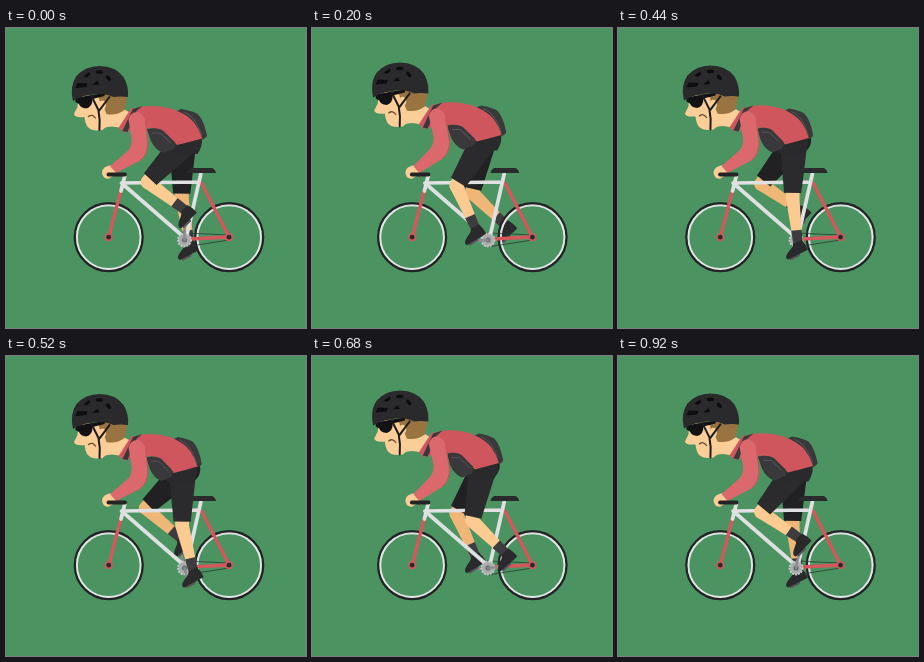
Recreate the animation shown at these times as an HTML page. Size 300x300 px, loop 0.96 s.

```html
<!DOCTYPE html>
<html lang="en">
<head>
<meta charset="utf-8">
<title>Cyclist</title>
<style>
  html, body { margin: 0; width: 100%; height: 100%; overflow: hidden; background: #4b9462; }
  svg { display: block; width: 100vw; height: 100vh; }
  .tube { fill: none; stroke: #dfe0e1; stroke-width: 3.7; stroke-linecap: round; stroke-linejoin: round; }
  .red { stroke: #d5575b; stroke-width: 3.4; }
  .crank { stroke: #8b8c8e; stroke-width: 2.6; stroke-linecap: round; }
  .dark { fill: #2a292b; }
  .bag { fill: #39383a; }
  .skin { fill: #fbcd97; }
  .seam { fill: none; stroke: #555456; stroke-width: 1; }
</style>
</head>
<body>
<svg viewBox="0 0 300 300" xmlns="http://www.w3.org/2000/svg">
  <defs>
    <g id="wheel" fill="none">
      <circle r="33.9" stroke="#242325" stroke-width="2.4"/>
      <circle r="31.8" stroke="#e4e5e6" stroke-width="1.9"/>
    </g>
    <g id="hub">
      <circle r="4" fill="#d5575b"/>
      <circle r="2.4" class="dark"/>
    </g>
    <g id="shoe">
      <rect x="-4" y="0" width="11" height="3" rx="1" fill="#56575a"/>
      <path class="dark" d="M-6.500-1C-6.500-4-1-6 4-8.500L6-11 15-11Q17-5 16.500 1H-5Q-6.500 1-6.500-1Z"/>
    </g>
  </defs>
  <rect width="300" height="300" fill="#4b9462"/>

  <g id="farLeg"></g>

  <g id="bike">
    <use href="#wheel" x="102.700" y="209.200"/>
    <use href="#wheel" x="223.200" y="209.200"/>
    <path d="M178 205L223 207M178 219L223 212" stroke="#2c3a31" stroke-width=".8"/>
    <path class="tube red" d="M115.500 160L102.800 209M195.500 155L223 209L184 211"/>
    <use href="#hub" x="102.700" y="209.200"/>
    <use href="#hub" x="223" y="209.200"/>
    <path class="tube" d="M194.800 146L180 211L115.500 155L193 154M119 147L115 163"/>
    <path class="dark" d="M185 140H206Q209 141 210 145H181Q182 141 185 140Z"/>
    <circle cx="178.500" cy="212" r="6.500" fill="#a9abad" stroke="#c9cacb" stroke-width="1.800" stroke-dasharray="2 1"/>
    <circle cx="178.500" cy="212" r="2.500" fill="#666769"/>
  </g>

  <g id="nearLeg"></g>

  <g id="body">
    <g id="back">
      <path class="bag" d="M164 86L174 81Q185 83 190 86Q196 92 199 108Q198 111 188 114L174 108Z"/>
      <path class="seam" d="M176 84Q188 88 194 108"/>
      <path class="dark" d="M154 112L185 105L194 110Q195 118 190 126L164 126Q156 120 154 112Z"/>
      <path fill="#cf565c" d="M120 102L133 79Q149 76 166 81Q181 87 187 95Q192 102 194.500 110.500Q182 114 170 117Q162 108 153 101L142 100L132 105Z"/>
      <path class="bag" d="M141 101Q152 99 157 103L168 114Q170 118 167 121L157 125Q149 122 145 113Z"/>
      <path class="seam" d="M146 105L154 105L164 115"/>
    </g>

    <path class="skin" d="M94 76L120 82L125 85L115 100Q106 97 98 100Z"/>
    <path fill="#cf565c" d="M113 100L126 80L131 80L119 105Z"/>
    <path class="bag" d="M117 103L127.500 81L137 78L131 83L122 104Z"/>

    <path class="skin" d="M73 68L104 66L106 84Q104 98 97 102Q86 104 81.500 98Q79.500 94 79 89Q70 90 68.500 86L72 79Z"/>
    <path fill="#9a7440" d="M92 66H121.500Q122 74 119 82Q111 88 101 86L98 78L95 75Z"/>
    <ellipse cx="97" cy="77" rx="3.600" ry="4.600" class="skin"/>
    <path d="M83 88.500Q87 85.500 90 90" fill="none" stroke="#6d452f" stroke-width="1.300" stroke-linecap="round"/>
    <path d="M70 70L86 67L100 65L99 68L87 71Q87 79 81 80.500Q75 80 73.500 76L70 74Z" fill="#121113"/>
    <path d="M86 68L93 82Q95 92 94 102M104 69L93.500 83" fill="none" stroke="#1d1c1e" stroke-width="2" stroke-linecap="round" stroke-linejoin="round"/>
    <path class="dark" d="M67.500 73Q64 58 71 48Q80 38 94 38Q110 38 118 49Q123.500 58 122.500 69Q115 68 108 69Q98 64 84 67Q76 68 67.500 73Z"/>
    <g fill="#0d0c0e">
      <path d="M70 60L72 55L82 55.500L81 59Z"/>
      <path d="M87 57L92 52.500L94 56.500ZM78 48L84 44L85 46.500L81 49.500Z"/>
      <ellipse cx="94" cy="44" rx="3.600" ry="1.800"/>
      <ellipse cx="103" cy="50" rx="3.200" ry="1.800" transform="rotate(50 103 50)"/>
    </g>
  </g>

  <path id="hand" class="skin"/>
  <path id="sleeve" fill="#da686c"/>
  <path id="fold" fill="none" stroke="#c65259" stroke-width="1"/>
  <path id="grip" d="M102.500 146.500H119" stroke="#242325" stroke-width="4" stroke-linecap="round"/>
</svg>

<script>
const LOOP = 960, STEP = 40, TAU = Math.PI * 2;
const THIGH = 56.5, SHIN = 48, CRANK = 16.5;
const el = id => document.getElementById(id);
const mix = (a, b, k) => [a[0] + (b[0] - a[0]) * k, a[1] + (b[1] - a[1]) * k];
const add = (a, b) => [a[0] + b[0], a[1] + b[1]];
const pt = p => p[0].toFixed(2) + ' ' + p[1].toFixed(2);

// Limb segment narrowing from radius ra to rb; optional round ends
function taper(a, b, ra, rb, roundA, roundB) {
  const d = Math.hypot(b[0] - a[0], b[1] - a[1]);
  const n = [(a[1] - b[1]) / d, (b[0] - a[0]) / d];
  const off = (p, r) => pt([p[0] + n[0] * r, p[1] + n[1] * r]);
  const end = (r, round, p) => round ? `A${r} ${r} 0 0 0 ${p}` : `L${p}`;
  return `M${off(a, ra)}L${off(b, rb)}${end(rb, roundB, off(b, -rb))}` +
    `L${off(a, -ra)}${end(ra, roundA, off(a, ra))}Z`;
}

// Knee position, bent forward (to the left)
function kneeAt(hip, ankle) {
  const dx = ankle[0] - hip[0], dy = ankle[1] - hip[1];
  const d = Math.min(Math.hypot(dx, dy), THIGH + SHIN - 0.1);
  const along = (d * d + THIGH * THIGH - SHIN * SHIN) / (2 * d);
  const out = Math.sqrt(Math.max(0, THIGH * THIGH - along * along));
  return [hip[0] + (dx * along - dy * out) / d, hip[1] + (dy * along + dx * out) / d];
}

function leg(axle, hip, turn, skin, shorts) {
  const pedal = add(axle, [-CRANK * Math.sin(turn), -CRANK * Math.cos(turn)]);
  const pitch = (36 + 10 * Math.cos(turn - 5.8)) * Math.PI / 180;
  const c = Math.cos(pitch), s = Math.sin(pitch);
  const ankle = add(pedal, [10 * c - 8 * s, -10 * s - 8 * c]);
  const knee = kneeAt(hip, ankle);
  const shape = (d, fill) => `<path d="${d}" fill="${fill}"/>`;
  return `<path class="crank" d="M${pt(axle)}L${pt(pedal)}"/>` +
    shape(taper(mix(hip, knee, 0.8), knee, 7.5, 6.8, false, true), skin) +
    shape(taper(knee, ankle, 6.8, 4.4, true, true), skin) +
    shape(taper(mix(knee, ankle, 0.7), ankle, 5.3, 4.7, false, true), '#3d3c3e') +
    `<use href="#shoe" transform="translate(${pt(pedal)}) rotate(${-pitch * 180 / Math.PI})"/>` +
    shape(taper(hip, mix(hip, knee, 0.93), 14, 8.6, true, false), shorts);
}

function arm(shift, grip) {
  const top = p => pt(add(p, shift));
  const mid = p => pt(add(p, mix(shift, grip, 0.5)));
  const low = p => pt(add(p, grip));
  el('sleeve').setAttribute('d',
    `M${top([123, 91])}Q${top([126, 83])} ${top([133, 84])}Q${top([140, 87])} ${top([141, 98])}` +
    `L${mid([142, 116])}Q${mid([142, 128])} ${mid([134, 133])}L${low([110, 145])}` +
    `L${low([104, 138])}L${mid([123, 122])}Q${mid([126, 118])} ${mid([126, 111])}Z`);
  el('fold').setAttribute('d', `M${top([140, 93])}L${mid([142, 115])}Q${mid([142, 126])} ${mid([135, 132])}`);
  el('hand').setAttribute('d',
    `M${low([106, 137])}Q${low([96, 138])} ${low([96, 145])}Q${low([97, 151.5])} ${low([103, 150.5])}` +
    `Q${low([107, 149])} ${low([111, 144])}Z`);
}

function draw(time) {
  const t = Math.floor((time % LOOP) / STEP) * STEP;
  const beat = TAU * t / LOOP;
  const sway = Math.cos(beat * 2 - 0.31) - 0.95;
  const turn = beat - 0.21 * sway;      // cranks run ahead as the rider leans forward
  const twist = Math.cos(beat - 0.35);  // hips swing once per pedal turn
  const ride = [1.6 * sway, 0], lean = [3.5 * sway - 0.6, 2.2 * sway];
  const axle = add([178.5, 212], ride), hip = add([179, 113], lean);
  const move = (id, p) => el(id).setAttribute('transform', `translate(${pt(p)})`);
  move('bike', ride);
  move('grip', ride);
  move('body', lean);
  el('back').setAttribute('transform', `translate(130 0) scale(${1 + 0.04 * twist} 1) translate(-130 0)`);
  el('farLeg').innerHTML = leg(axle, add(hip, [-2 * twist, 0]), turn + Math.PI, '#efb677', '#212022');
  el('nearLeg').innerHTML = leg(axle, add(hip, [2 * twist, 0]), turn, '#fbcb91', '#2b2a2c');
  arm(lean, ride);
}

const start = performance.now();
function tick() {
  draw(performance.now() - start);
  requestAnimationFrame(tick);
}
tick();
</script>
</body>
</html>
```
